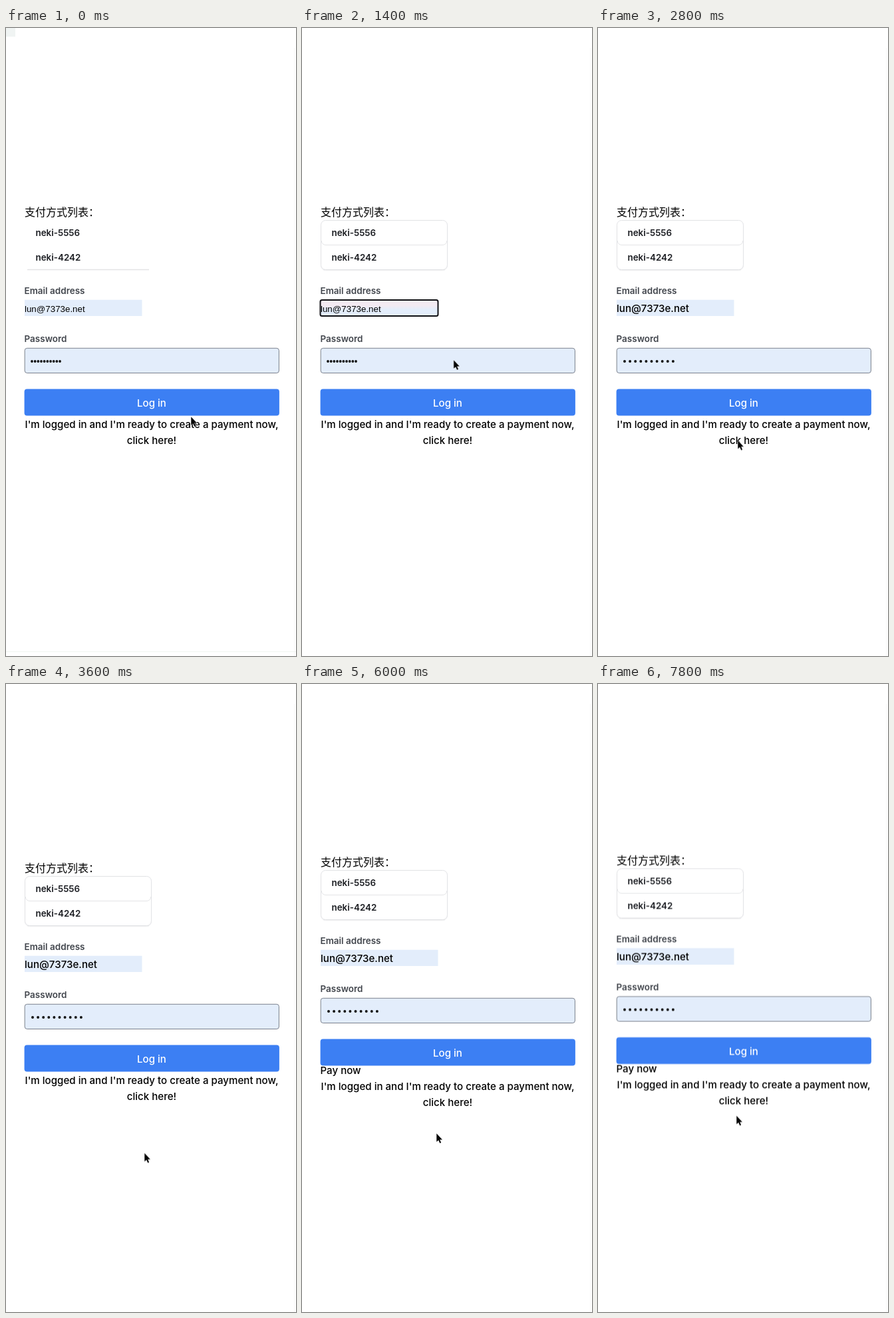
An HTML page that plays this animation: 436x942 px, repeating every 8 s.

```html
<!DOCTYPE html>
<html lang="en">
<head>
<meta charset="utf-8">
<title>Payment login</title>
<style>
  html, body { margin: 0; width: 100%; height: 100%; overflow: hidden; background: #fff; }
  svg { display: block; width: 100%; height: 100%; }
  text { font: 450 15.1px Inter, sans-serif; fill: #000; }
  .title { font: 500 16px "Noto Sans CJK SC", "Noto Sans CJK", sans-serif; }
  .label { font-size: 13.5px; font-weight: 600; fill: #42464d; }
  .card { font-size: 13.4px; font-weight: 600; fill: #1b1d22; }
  .small { font: 13.33px "Liberation Sans", Arial, sans-serif; }
  .center { text-anchor: middle; }
  .field { fill: #e3edfb; }
  .dots { stroke: #111; stroke-linecap: round; }

  /* Every step of the loop is 200 ms, or 2.5% */
  .form, .message, .pointer, .toggle { animation: 8s step-end infinite; }
  .form { animation-name: form; }
  .message { animation-name: message; }
  .pointer { animation-name: pointer; }
  .corner { animation-name: corner; }
  .baseline { animation-name: baseline; }
  .frame { animation-name: frame; }
  .divider { animation-name: divider; }
  .focus { animation-name: focus; }
  .before { animation-name: before; }
  .after { animation-name: after; }
  .pay { animation-name: pay; }
  .arrow { animation-name: arrow; }
  .hand { animation-name: hand; }

  @keyframes form {
    0% { transform: none; }
    50% { transform: translateY(-9px); }
    85%, 100% { transform: translateY(-11.5px); }
  }
  @keyframes message {
    0% { transform: none; }
    50%, 100% { transform: translateY(18px); }
  }
  @keyframes pointer {
    0% { transform: translate(278px, 583px); animation-timing-function: steps(3); }
    7.5% { transform: translate(180px, 424px); animation-timing-function: steps(2); }
    12.5% { transform: translate(239px, 446px); animation-timing-function: steps(5); }
    25%, 32.5% { transform: translate(211px, 576px); animation-timing-function: steps(3); }
    40%, 65% { transform: translate(208px, 703.5px); animation-timing-function: steps(4); }
    75%, 80% { transform: translate(202px, 674px); animation-timing-function: steps(5); }
    92.5% { transform: translate(207px, 655px); animation-timing-function: steps(2); }
    97.5%, 100% { transform: translate(208px, 647.5px); }
  }
  @keyframes corner { 0% { opacity: 1; } 2.5%, 100% { opacity: 0; } }
  @keyframes baseline { 0% { opacity: 1; } 15%, 100% { opacity: 0; } }
  @keyframes frame { 0% { opacity: 0; } 7.5% { opacity: .55; } 17.5%, 100% { opacity: 1; } }
  @keyframes divider { 0% { opacity: 0; } 17.5%, 100% { opacity: 1; } }
  @keyframes focus { 0% { opacity: 0; } 7.5% { opacity: 1; } 35%, 100% { opacity: 0; } }
  @keyframes before { 0% { opacity: 1; } 35%, 100% { opacity: 0; } }
  @keyframes after { 0% { opacity: 0; } 35%, 100% { opacity: 1; } }
  @keyframes pay { 0% { opacity: 0; } 50%, 100% { opacity: 1; } }
  @keyframes arrow { 0% { opacity: 1; } 22.5% { opacity: 0; } 35%, 100% { opacity: 1; } }
  @keyframes hand { 0% { opacity: 0; } 22.5% { opacity: 1; } 35%, 100% { opacity: 0; } }
</style>
</head>
<body>
<svg viewBox="0 0 436 942">
  <defs>
    <linearGradient id="tint" x2="0" y2="1">
      <stop offset=".35" stop-color="#f3eaf2"/>
      <stop offset=".6" stop-color="#e3edfb"/>
    </linearGradient>
  </defs>

  <path d="M433.5 30V942" stroke="#f8f8f8"/>
  <rect class="toggle corner" width="14" height="13" fill="#f0f4f3"/>
  <path class="toggle baseline" d="M0 935.5H436" stroke="#f1f5f1"/>

  <g class="form">
    <text class="title" lang="zh" x="28" y="282">支付方式列表：</text>
    <path d="M32 362.5H215" stroke="#e3e3e5" stroke-width="1.5"/>
    <g class="toggle frame" fill="none">
      <rect x="28.5" y="289.5" width="190" height="74" rx="7" stroke="#eeeeef"/>
      <rect x="28.5" y="288.5" width="190" height="74" rx="7" fill="#fff" stroke="#e1e2e5"/>
    </g>
    <path class="toggle divider" d="M29 319Q30 325.5 36 325.5H211Q217 325.5 218 319" fill="none" stroke="#e3e4e6"/>
    <text class="card" x="44.5" y="312">neki-5556</text>
    <text class="card" x="44.5" y="349">neki-4242</text>

    <text class="label" x="27.5" y="399">Email address</text>
    <rect class="field" x="28" y="407.7" width="176.5" height="24.3"/>
    <rect class="toggle focus" x="27.5" y="408" width="177" height="24" rx="2.5" fill="url(#tint)" stroke="#101014" stroke-width="2"/>
    <text class="small toggle before" x="28" y="426">lun@7373e.net</text>
    <text class="toggle after" x="28" y="426">lun@7373e.net</text>

    <text class="label" x="27.5" y="471">Password</text>
    <rect class="field" x="28.2" y="480.3" width="382.2" height="37.2" rx="3.5" stroke="#7b818c"/>
    <path class="dots toggle before" d="M39 500H82" stroke-width="3.8" stroke-dasharray="0 4.67"/>
    <path class="dots toggle after" d="M40 500H115" stroke-width="4" stroke-dasharray="0 8.1"/>

    <rect x="27.6" y="541.6" width="383.3" height="40" rx="4" fill="#3c7ff3"/>
    <text class="center" x="219" y="567.5" style="fill:#fff">Log in</text>
    <text class="toggle pay" x="27.5" y="594">Pay now</text>
    <g class="message center">
      <text x="219" y="600">I'm logged in and I'm ready to create a payment now,</text>
      <text x="219" y="624">click here!</text>
    </g>
  </g>

  <g class="pointer">
    <path class="toggle arrow" d="M.3 .3V12.800L3.200 10.200 5.200 14.800 7.200 13.900 5.200 9.400H9Z" fill="#050505" stroke="#fff" paint-order="stroke"/>
    <path class="toggle hand" d="M0 1.5Q1.3-.8 2.6 1.5L3.8 6Q5 4.8 6 6 7.3 5 8.3 6.4 10 6 10.3 8L10 13 8.5 17H2L-3 10.5Q-3.5 8-1 9L1 10Z" fill="#fff" stroke="#333" stroke-width=".9" stroke-linejoin="round"/>
  </g>
</svg>
</body>
</html>
```
